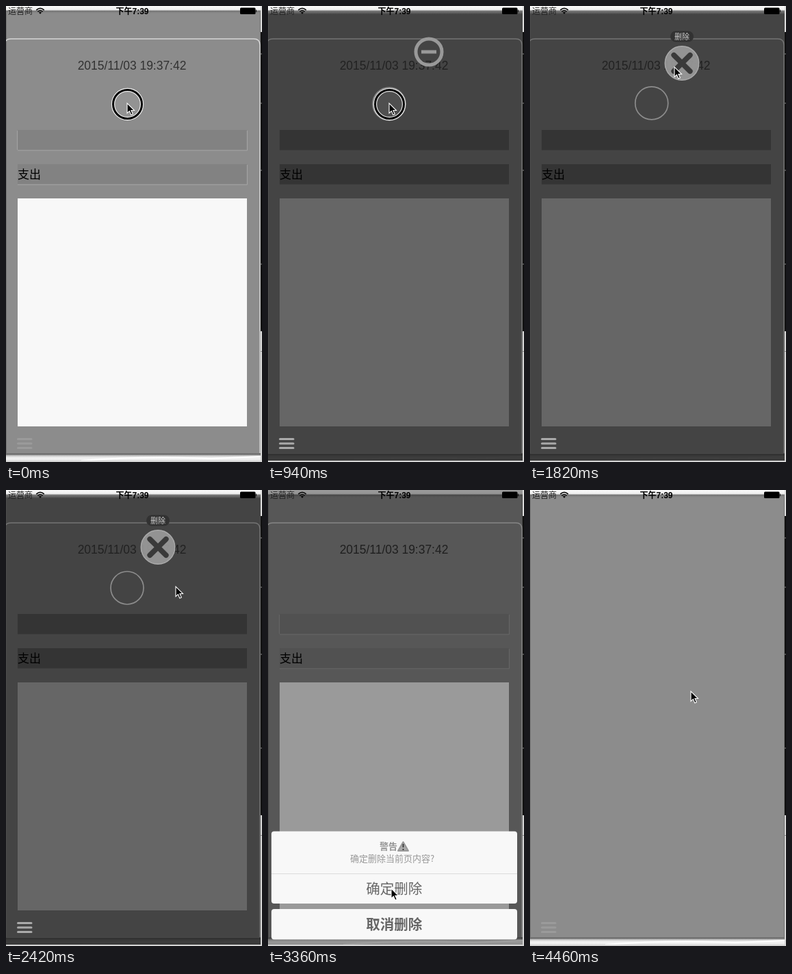
An HTML page that plays this animation: 374x666 px, repeating every 4.48 s.

```html
<!DOCTYPE html>
<html lang="zh-CN">
<head>
<meta charset="utf-8">
<title>删除</title>
<style>
html, body { margin: 0; width: 100%; height: 100%; overflow: hidden; }
svg { display: block; width: 100vw; height: 100vh; }
text { font-family: "Noto Sans CJK SC", "Noto Sans CJK", sans-serif; }
.latin { font-family: "Liberation Sans", "Noto Sans CJK SC", sans-serif; }
</style>
</head>
<body>
<svg viewBox="0 0 374 666">
  <defs>
    <linearGradient id="topFade" x1="0" y1="0" x2="0" y2="1">
      <stop offset="0" stop-color="#fafafa"/>
      <stop offset=".45" stop-color="#eee"/>
      <stop offset=".62" stop-color="#747474"/>
      <stop offset="1" stop-color="#8c8c8c" stop-opacity="0"/>
    </linearGradient>
    <linearGradient id="baseFade" x1="0" y1="0" x2="0" y2="1">
      <stop offset="0" stop-color="#555"/>
      <stop offset=".3" stop-color="#ccc"/>
      <stop offset=".6" stop-color="#f4f4f4"/>
      <stop offset="1" stop-color="#e6e6e6"/>
    </linearGradient>
    <clipPath id="screen"><rect width="372" height="664"/></clipPath>
  </defs>

  <rect width="374" height="666" fill="#d4d4d4"/>
  <rect x="372" width="2" height="38" fill="#ddd"/>
  <rect x="372" y="38" width="2" height="437" fill="#111"/>
  <path d="M372 70h2M372 142h2M372 240h2M372 377h2M372 504.5h2" stroke="#888"/>

  <g clip-path="url(#screen)">
    <rect id="page" width="372" height="655"/>
    <rect y="654" width="372" height="10" fill="url(#baseFade)"/>
    <path d="M110 664Q200 657 300 661L372 658" fill="none" stroke="#fff" stroke-width="2"/>
    <rect id="baseShade" y="654" width="372" height="10" fill="#292929"/>
    <path id="edge" d="M0 653.8H372M.5 9V653M371.5 9V653" stroke="#555" stroke-opacity=".45" fill="none"/>

    <g id="card">
      <path id="border" d="M-2 60V57Q-2 48 7 48H362Q371 48 371 57V653" fill="none" stroke-width="1.4"/>
      <text id="date" class="latin" x="184" y="93" font-size="17.45" text-anchor="middle">2015/11/03 19:37:42</text>
      <g id="fields">
        <rect x="17" y="181" width="335" height="29.5"/>
        <rect x="17" y="231" width="335" height="29.5"/>
      </g>
      <path id="fieldLine" d="M17 210.9H352.4V182M17 260.9H352.4V232M16.6 182V210" fill="none" stroke="#a6a6a6"/>
      <text x="17" y="251.5" font-size="17">支出</text>
      <rect id="note" x="17" y="281" width="335" height="333"/>
    </g>

    <path id="burger" d="M17.5 632.5H37M17.5 639H37M17.5 645.5H37" stroke-width="3" stroke-linecap="round"/>
    <rect width="372" height="12" fill="url(#topFade)"/>

    <g id="menu">
      <g id="icon">
        <g id="minus" fill="none" stroke="#999" stroke-width="5">
          <circle r="19"/><path d="M-11 0H11"/>
        </g>
        <g id="cross">
          <circle r="21" fill="#999" fill-opacity=".93" stroke="#aaa" stroke-width="1.2"/>
          <path d="M-10-10L10 10M10-10L-10 10" stroke="#3a3a3a" stroke-width="6.5" stroke-linecap="round"/>
        </g>
      </g>
      <g id="label">
        <rect x="205" y="36.5" width="34" height="16" rx="8" fill="#323232"/>
        <text x="222" y="48.5" font-size="11" text-anchor="middle" fill="#ccc">删除</text>
      </g>
      <circle id="handle" r="24" fill="none" stroke="#8c8c8c" stroke-width="1.7"/>
    </g>

    <rect id="dim" width="372" height="664"/>

    <g id="sheet" text-anchor="middle">
      <rect x="5" y="498.5" width="359" height="105.5" rx="4" fill="#f8f8f8"/>
      <rect x="5" y="612" width="359" height="44.5" rx="4" fill="#f8f8f8"/>
      <path d="M5 560.5H364" stroke="#dcdcdc"/>
      <text x="176" y="525.3" font-size="13" font-weight="700" fill="#929292">警告</text>
      <path d="M197.5 514L205 527H190Z" fill="#aaa" stroke="#999" stroke-width="2" stroke-linejoin="round"/>
      <path d="M197.5 517V522M197.5 524V526" stroke="#333" stroke-width="1.7"/>
      <text x="181.5" y="542.5" font-size="13" fill="#999">确定删除当前页内容?</text>
      <text x="184.3" y="590" font-size="20.5" fill="#666">确定删除</text>
      <text x="184.3" y="641.7" font-size="20.5" font-weight="700" fill="#666">取消删除</text>
    </g>
  </g>

  <g>
    <text x="3" y="11.5" font-size="12" fill="#222">运营商</text>
    <g fill="none" stroke="#111" stroke-width="1.7">
      <path d="M44.3 6Q50 .8 55.7 6M46.4 8.3Q50 5 53.6 8.3"/>
    </g>
    <path d="M48 9.6Q50 8 52 9.6L50 11.8Z"/>
    <text x="184.5" y="11.5" class="latin" font-size="12" font-weight="700" text-anchor="middle">下午7:39</text>
    <rect x="342" y="2.5" width="22.5" height="9.5" rx="1.5"/>
    <path d="M365 5Q367 7.2 365 9.5Z"/>
  </g>

  <g id="ring" fill="none">
    <circle r="21" fill="#fff" fill-opacity=".06" stroke="#fff" stroke-opacity=".85" stroke-width="5.4"/>
    <circle r="21" stroke="#000" stroke-width="3"/>
  </g>
  <path id="cursor" d="M0 0V14.5L3.4 11.4L5.8 17L8.3 16L5.9 10.5H10.5Z" fill="#000" stroke="#fff" stroke-width="1.1"/>
</svg>

<script>
const LOOP = 4480, HOME = [177, 143];
const el = {};
document.querySelectorAll("svg [id]").forEach(n => el[n.id] = n);

const clamp = x => Math.min(1, Math.max(0, x));
const span = (t, a, b) => clamp((t - a) / (b - a));
const smooth = x => x * x * (3 - 2 * x);
const outCubic = x => 1 - (1 - x) ** 3;
const outBack = x => 1 + 2.2 * (x - 1) ** 3 + 1.2 * (x - 1) ** 2;
const mix = (a, b, k) => a + (b - a) * k;
const grey = (a, b, k) => { const v = Math.round(mix(a, b, k)); return `rgb(${v},${v},${v})`; };
const fill = (n, a, b, k) => n.setAttribute("fill", grey(a, b, k));
const stroke = (n, a, b, k) => n.setAttribute("stroke", grey(a, b, k));
const alpha = (n, v) => n.setAttribute("opacity", v);
const place = (n, x, y, s = 1) => n.setAttribute("transform", `translate(${x} ${y}) scale(${s})`);

// time, x, y
const path = [
  [0, 177, 142], [1100, 177, 142], [1400, 211, 89], [2160, 211, 89],
  [2420, 248, 141], [2660, 220, 503], [2780, 220, 503], [3300, 179, 579],
  [3360, 180, 582], [3880, 180, 582], [4280, 222, 351], [4420, 222, 351],
  [4460, 235, 294], [LOOP, 235, 294]
];

function pointer(t) {
  const i = Math.max(1, path.findIndex(p => p[0] > t));
  const [t0, x0, y0] = path[i - 1], [t1, x1, y1] = path[i];
  const k = smooth(span(t, t0, t1));
  return [mix(x0, x1, k), mix(y0, y1, k)];
}

// Handle displacement along the drag: lags behind, then springs home.
function pull(t) {
  if (t < 1480) return .72 * smooth(span(t, 1100, 1510));
  const s = (t - 1480) / 1000;
  return t < 1920 ? .72 * Math.exp(-10 * s) * Math.cos(20 * s) : 0;
}

function sheetShown(t) {
  if (t < 3880) {
    const run = t < 2660 ? t - 2440 : 220 + Math.max(0, t - 2780);
    return outCubic(clamp(run / 600));
  }
  return 1 - smooth(span(t, 3880, 4160));
}

function drawPage(t, dark) {
  fill(el.page, 140, 68, dark);
  fill(el.fields, 130, 52, dark);
  fill(el.note, 248, 102, dark);
  fill(el.date, 50, 34, dark);
  stroke(el.border, 216, 116, dark);
  stroke(el.burger, 155, 170, dark);
  alpha(el.fieldLine, 1 - dark);
  alpha(el.baseShade, dark * .9);
  alpha(el.card, 1 - smooth(span(t, 3960, 4280)));
}

function drawMenu(t, dark) {
  const out = outBack(span(t, 560, 940));
  const near = smooth(span(t, 1290, 1505));
  const picked = t >= 1500;
  place(el.icon, mix(HOME[0], 235, out) - 13 * near, mix(HOME[1], 67, out) + 16.5 * near,
    mix(.3, 1, clamp(out)) + .18 * near);
  alpha(el.minus, picked ? 0 : 1);
  alpha(el.cross, picked ? 1 : 0);
  alpha(el.label, span(t, 1500, 1620));
  const k = pull(t);
  place(el.handle, HOME[0] + 35 * k, HOME[1] - 53 * k);
  alpha(el.menu, dark);
}

function draw(t) {
  const dark = smooth(span(t, 560, 880)) * (1 - smooth(span(t, 2430, 2600)));
  drawPage(t, dark);
  drawMenu(t, dark);

  const shown = sheetShown(t);
  place(el.sheet, 0, 168 * (1 - shown));
  alpha(el.sheet, shown > 0 ? 1 : 0);
  alpha(el.dim, .38 * shown);

  const [x, y] = pointer(t);
  place(el.cursor, x, y);
  const tap = t >= 3540 && t < 3740;
  place(el.ring, x + .5, y + 1.5, tap ? mix(.8, 1, span(t, 3520, 3600)) : 1);
  alpha(el.ring, tap ? span(t, 3520, 3600) : 1 - span(t, 1480, 1540));
}

function tick(now) {
  draw(now % LOOP);
  requestAnimationFrame(tick);
}
draw(0);
requestAnimationFrame(tick);
</script>
</body>
</html>
```
